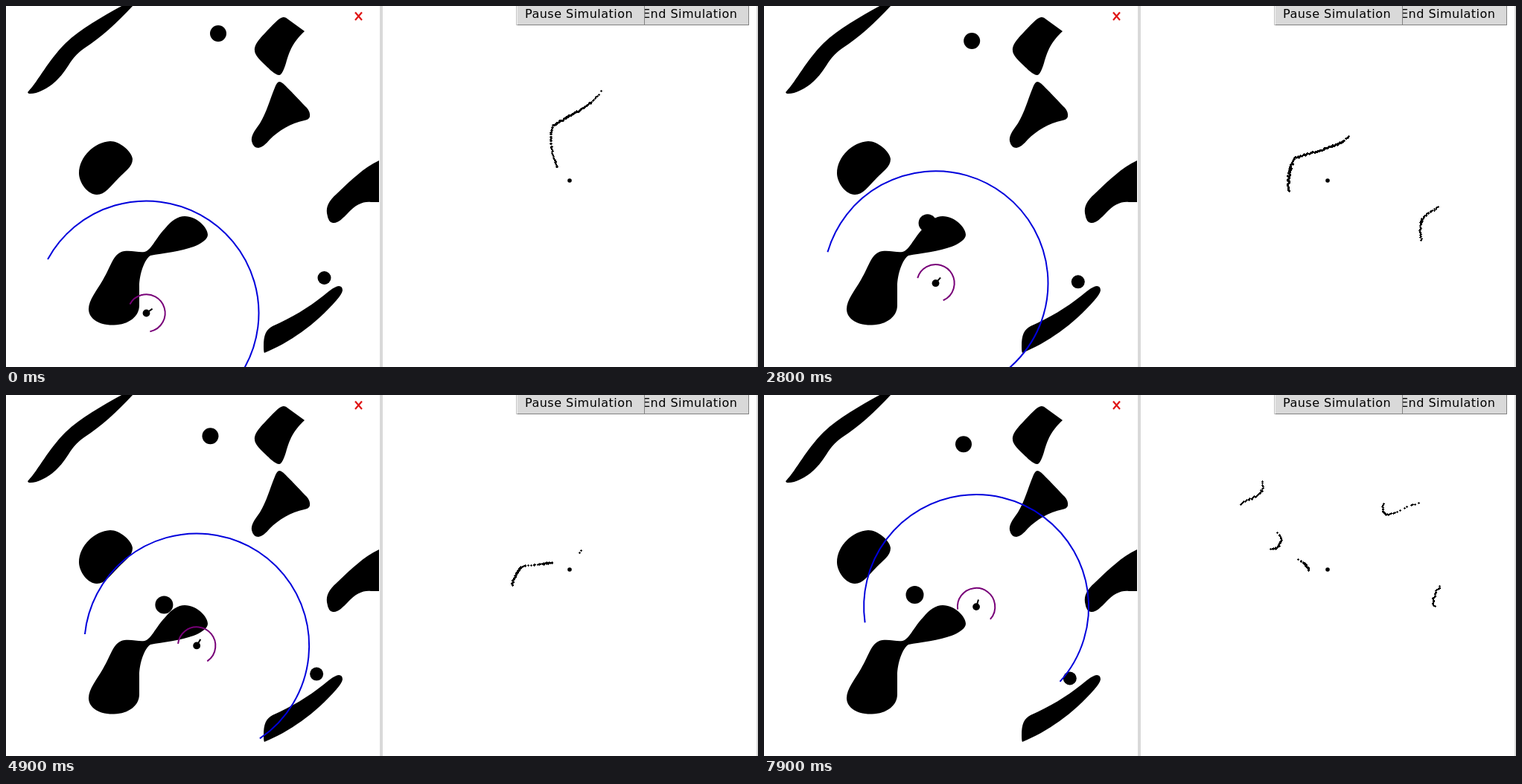
These frames come from a looping animation (1010 px wide and 486 px high, 8000 ms). An HTML page with a canvas:

```html
<!DOCTYPE html>
<html lang="en">
<head>
<meta charset="utf-8">
<title>Range scanner simulation</title>
<style>
  html, body { margin: 0; width: 100%; height: 100%; overflow: hidden; background: #fff; }
  #stage { position: relative; width: 1010px; height: 486px; overflow: hidden; }
  canvas { position: absolute; left: 0; top: 0; }
  .bar { position: absolute; top: 0; height: 486px; background: #d9d9d9; }
  .button {
    position: absolute; top: -10px; height: 36px; box-sizing: border-box;
    background: #d9d9d9; border: 1px solid #828282; border-left-color: #f4f4f4;
    box-shadow: -1px 0 #c4c4c4;
    font: 16px/39px "DejaVu Sans", sans-serif; letter-spacing: .03em; color: #000; white-space: pre;
  }
</style>
</head>
<body>
<div id="stage">
  <canvas id="view" width="1010" height="486"></canvas>
  <div class="bar" style="left:502px;width:4px"></div>
  <div class="bar" style="left:1008px;width:2px"></div>
  <div class="button" style="left:842px;width:156px;padding-left:12px">End Simulation</div>
  <div class="button" style="left:686px;width:172px;padding-left:10px">Pause Simulation</div>
</div>
<script>
const WIDTH = 1010, HEIGHT = 486, WORLD_WIDTH = 502;
const TICK = 100, TICKS = 80, RAD = Math.PI / 180;
const SCAN_CENTER = { x: 757, y: 235 };
const NEAR = 25.5, FAR = 152.5, RAY_STEP = 0.5;

const obstacles = [
  'M171-1C150 22 128 42 105 57C84 72 84 86 66 102C55 112 40 119 31 118Q28 117 30 115C44 100 56 74 80 50C101 30 130 14 157-1Z',
  'M373 15Q376 15 379 18L401 34C385 49 381 60 376 77Q371 93 367 93Q363 93 356 87C348 79 334 68 334 60C333 50 345 40 351 33C358 26 367 15 373 15Z',
  'M367 102Q370 102 375 107C386 118 397 130 404 137Q409 143 408 149Q407 153 401 154C382 158 366 168 354 180Q346 190 339 191Q332 191 330 182C329 175 333 169 341 158C350 143 354 127 361 110Q364 102 367 102Z',
  'M140 182C153 182 169 196 170 206C170 217 160 222 150 233C140 243 133 254 122 254C110 254 98 238 98 225C98 203 119 183 140 182Z',
  'M501 208C480 218 464 234 444 253C433 263 430 270 431 279Q433 292 439 292C446 293 453 285 459 279C470 267 480 263 490 264L501 264Z',
  'M447 377Q452 377 452 383Q451 388 444 396C430 412 414 427 397 439C380 451 364 460 347 467Q346 466 346 458C346 443 349 436 358 431C385 419 406 406 425 391C434 384 440 378 447 377Z',
  'M240 283C256 283 271 298 271 308C271 314 262 320 252 324C236 330 210 333 194 336C186 341 179 361 179 378L179 403C179 418 165 429 145 429.5C122 430 111 419 111 408C111 396 122 383 130 369C142 349 144 332 159 330C170 329 178 332 186 331C195 329 200 314 214 299C222 289 231 283 240 283Z'
].map(d => new Path2D(d));

// Start position, total travel over the run, radius
const movers = [
  { x: 285, y: 37, dx: -17, dy: 29.3, r: 11 },
  { x: 427.5, y: 366, dx: -16.7, dy: 15.5, r: 9 },
  { x: 228.5, y: 304.5, dx: -26, dy: -35.6, r: 12 }
];

// Robot route: tick, x, y
const route = [
  [0, 188.5, 413.5], [11, 206.8, 398.3], [27, 230.5, 373.2], [42, 248.2, 349.4],
  [56, 264.1, 325.5], [66, 276.1, 311.5], [79, 285.1, 285.1]
];

// Ticks on which the display is not refreshed
const scanHolds = [1, 8, 18, 29, 37, 55, 60, 70, 73];
const worldHolds = [...scanHolds, 28];

const view = document.getElementById('view').getContext('2d');
const worldCanvas = document.createElement('canvas');
worldCanvas.width = WORLD_WIDTH;
worldCanvas.height = HEIGHT;
const world = worldCanvas.getContext('2d', { willReadFrequently: true });

function heldTick(tick, holds) {
  while (holds.includes(tick)) tick--;
  return tick;
}

function robotAt(tick) {
  const i = Math.max(1, route.findIndex(p => p[0] >= tick));
  const [t0, x0, y0] = route[i - 1], [t1, x1, y1] = route[i];
  const k = (tick - t0) / (t1 - t0);
  return { x: x0 + (x1 - x0) * k, y: y0 + (y1 - y0) * k, heading: -36.3 - 0.466 * tick };
}

function disc(ctx, x, y, r) {
  ctx.beginPath();
  ctx.arc(x, y, r, 0, 2 * Math.PI);
  ctx.fill();
}

function arc(robot, radius, color) {
  view.strokeStyle = color;
  view.beginPath();
  view.arc(robot.x, robot.y, radius, (robot.heading - 115) * RAD, (robot.heading + 115) * RAD);
  view.stroke();
}

function line(x0, y0, x1, y1) {
  view.beginPath();
  view.moveTo(x0, y0);
  view.lineTo(x1, y1);
  view.stroke();
}

function paintWorld(tick) {
  world.clearRect(0, 0, WORLD_WIDTH, HEIGHT);
  obstacles.forEach(path => world.fill(path));
  const k = tick / 79;
  movers.forEach(m => disc(world, m.x + m.dx * k, m.y + m.dy * k, m.r));
}

function drawScan(tick) {
  paintWorld(tick);
  const pixels = world.getImageData(0, 0, WORLD_WIDTH, HEIGHT).data;
  const robot = robotAt(tick);
  const turn = -56 - robot.heading;
  const solid = (x, y) => x >= 0 && y >= 0 && x < WORLD_WIDTH && y < HEIGHT &&
    pixels[(y * WORLD_WIDTH + x) * 4 + 3] > 127;

  for (let angle = -195; angle <= 33; angle += RAY_STEP) {
    const a = (angle - turn) * RAD;
    let d = 2;
    while (d < FAR && !solid(Math.floor(robot.x + d * Math.cos(a)), Math.floor(robot.y + d * Math.sin(a)))) d += 2;
    if (d < NEAR || d >= FAR) continue;
    const x = Math.round(SCAN_CENTER.x + d * Math.cos(angle * RAD));
    const y = Math.round(SCAN_CENTER.y + d * Math.sin(angle * RAD));
    view.fillRect(x - 1, y, 3, 1);
    view.fillRect(x, y - 1, 1, 3);
  }
  disc(view, SCAN_CENTER.x, SCAN_CENTER.y, 2.8);
}

function drawWorld(tick) {
  paintWorld(tick);
  view.save();
  view.beginPath();
  view.rect(0, 0, WORLD_WIDTH, HEIGHT);
  view.clip();
  view.drawImage(worldCanvas, 0, 0);
  const robot = robotAt(tick), a = robot.heading * RAD;
  view.lineWidth = 2;
  arc(robot, 151, '#0000dc');
  arc(robot, 25.2, '#780078');
  disc(view, robot.x, robot.y, 4.9);
  view.strokeStyle = '#000';
  line(robot.x, robot.y, robot.x + 10 * Math.cos(a), robot.y + 10 * Math.sin(a));
  view.strokeStyle = '#e01414';
  view.lineWidth = 2.2;
  line(469, 8.5, 478, 19);
  line(478, 8.5, 469, 19);
  view.restore();
}

let lastTick = -1;
function frame() {
  const tick = Math.floor(performance.now() / TICK) % TICKS;
  if (tick !== lastTick) {
    lastTick = tick;
    view.fillStyle = '#fff';
    view.fillRect(0, 0, WIDTH, HEIGHT);
    view.fillStyle = '#000';
    drawScan(heldTick(tick, scanHolds));
    drawWorld(heldTick(tick, worldHolds));
  }
  requestAnimationFrame(frame);
}
frame();
</script>
</body>
</html>
```
